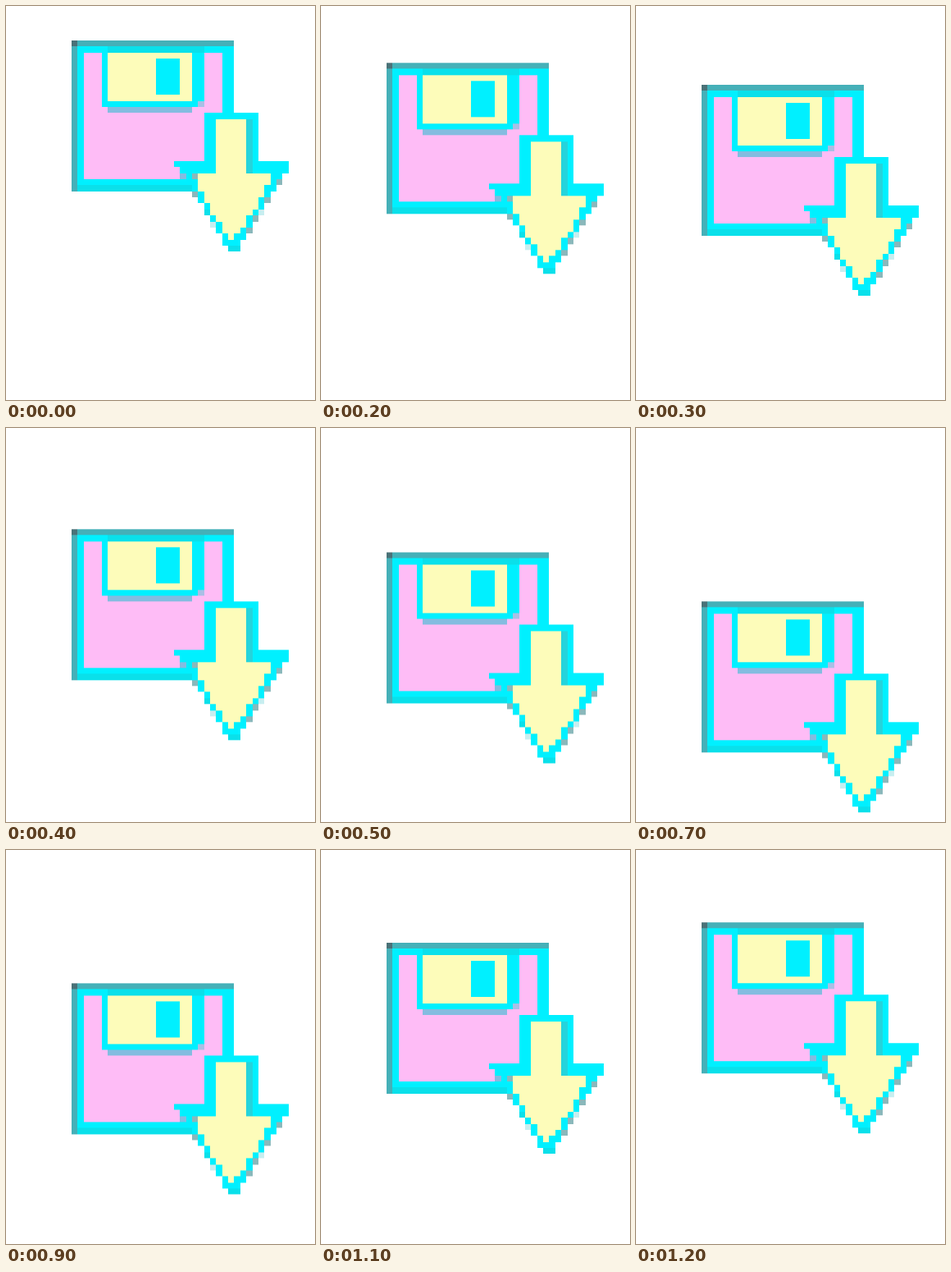
Write an HTML page that moves like this. It is 377 by 480 pixels and loops after 1.3 s.

```html
<!DOCTYPE html>
<html lang="en">
<head>
<meta charset="utf-8">
<title>Save icon</title>
<style>
html, body { margin: 0; width: 100%; height: 100%; overflow: hidden; background: #fff; }
svg { display: block; width: 377px; height: 480px; }
.icon { animation: bob 1300ms step-end infinite; }
/* speeds up on the way down, returns at an even pace */
@keyframes bob {
  0% { transform: translateY(0); }
  7.692% { transform: translateY(11px); }
  15.384% { transform: translateY(27.3px); }
  23.076% { transform: translateY(54px); }
  30.769% { transform: translateY(81.3px); }
  38.461% { transform: translateY(109.5px); }
  46.153% { transform: translateY(138.4px); }
  53.846% { transform: translateY(169.3px); }
  61.538% { transform: translateY(144.7px); }
  69.23% { transform: translateY(120.4px); }
  76.923% { transform: translateY(95.7px); }
  84.615% { transform: translateY(71px); }
  92.307% { transform: translateY(46.2px); }
}
.cyan { fill: #00f0ff; }
.deep { fill: #0ae0ea; }
.teal { fill: #45b0b8; }
.pink { fill: #febcf6; }
.cream { fill: #fdfcba; }
.shade { fill: #25d4dc; }
.shadow { fill: #84bce0; }
.grey { fill: #8ab8bb; }
.pale { fill: #c8eef0; }
</style>
</head>
<body>
<svg viewBox="0 0 377 480" shape-rendering="crispEdges">
  <g class="icon">
    <!-- one unit is one pixel of the icon -->
    <g transform="translate(80 42) scale(7.35)">
      <!-- disk -->
      <path class="teal" d="M0 0H27V1H1V25H0Z"/>
      <path fill="#4a7278" d="M0 0H1V1H0Z"/>
      <path class="cyan" d="M1 1H27V24H1Z"/>
      <path class="deep" d="M1 24H20V25H1ZM6 1H22V2H6Z"/>
      <path class="pink" d="M2 2H25V23H2Z"/>
      <path fill="#fff" d="M25 12H27V25H25Z"/>

      <!-- shutter -->
      <path class="cyan" d="M5 2H22V10H21V11H5Z"/>
      <path class="cream" d="M6 2H20V10H6Z"/>
      <path class="cyan" d="M14 3H18V9H14Z"/>
      <path class="shadow" d="M6 11H20V12H6Z"/>
      <path fill="#a9bfe6" d="M21 10H22V11H21Z"/>

      <!-- arrow -->
      <path class="cyan" d="M22 12H31V20H36V22H35V23H34V25H33V26H32V28H31V29H30V31H29V33H28V35H26V34H25V32H24V30H23V28H22V27H21V26H20V24H19V22H18V21H17V20H22Z"/>
      <path class="cream" d="M24 13H29V22H33V24H32V26H31V28H30V29H29V31H28V32H27V33H26V32H25V30H24V29H23V27H22V25H21V22H24Z"/>
      <path class="shade" d="M29 13H30V22H29Z"/>
      <path class="shadow" d="M18 22H19V23H18Z"/>
      <path class="grey" d="M20 22H21V23H20ZM20 25H21V26H20ZM34 23H35V24H34ZM32 26H33V27H32ZM30 29H31V30H30ZM29 31H30V32H29Z"/>
      <path class="deep" d="M22 28H23V29H22ZM26 34H28V35H26Z"/>
      <path class="pale" d="M23 30H24V31H23ZM31 28H32V29H31Z"/>
    </g>
  </g>
</svg>
</body>
</html>
```
